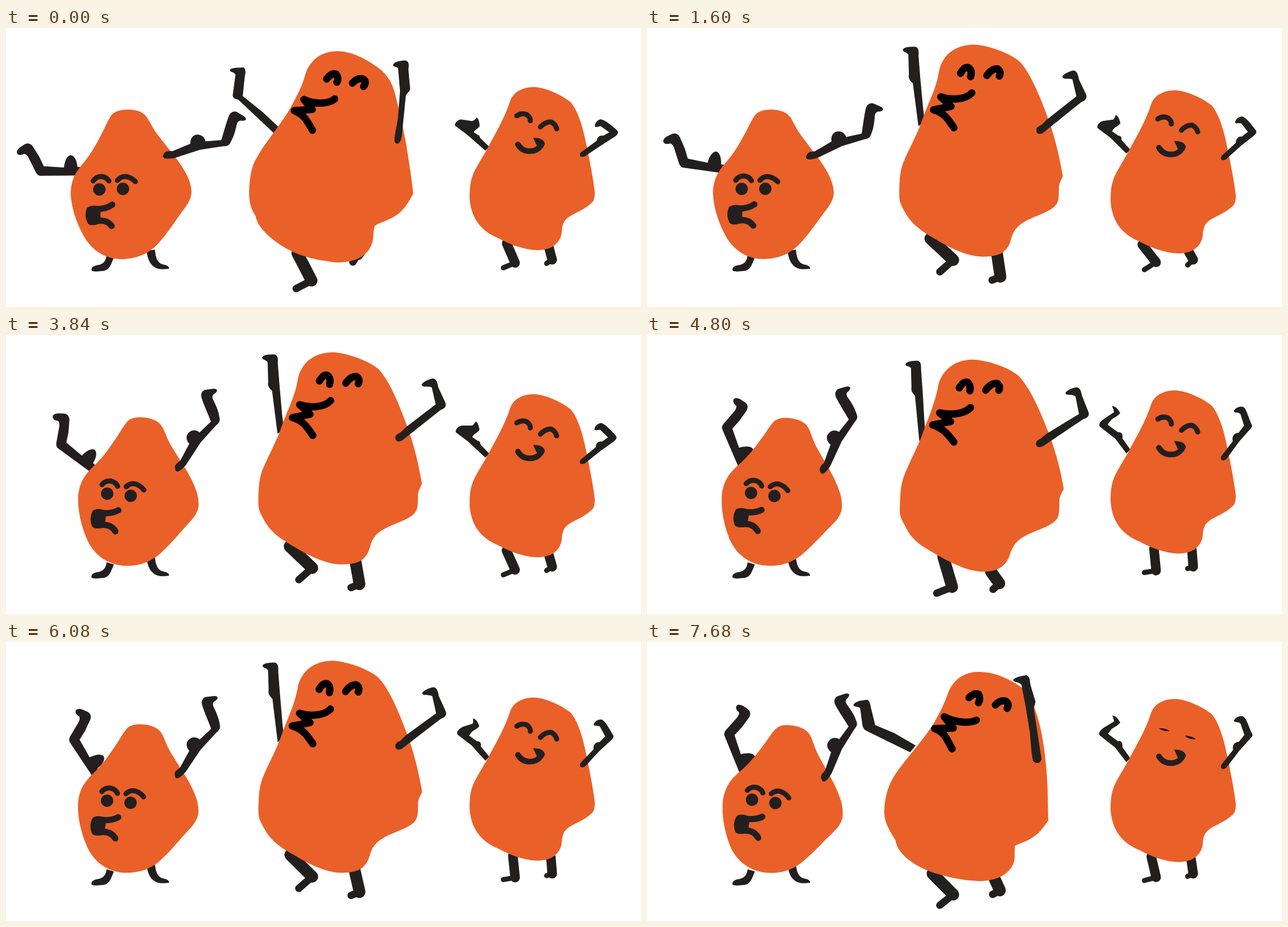
An HTML page that plays this animation: 1130 px wide and 496 px high, repeating every 8 s.

```html
<!DOCTYPE html>
<html lang="en">
<head>
<meta charset="utf-8">
<title>Three dancers</title>
<style>
html, body { margin: 0; height: 100%; overflow: hidden; background: #fff; }
svg { display: block; }
</style>
</head>
<body>
<svg id="stage" width="1130" height="496" viewBox="0 0 1130 496"></svg>
<script>
const ORANGE = '#ea6029', DARK = '#231f20', LIMB = '#22201f', STEP = 320, LOOP = 8000;
const stage = document.getElementById('stage');

const wave = turns => (1 - Math.cos(2 * Math.PI * turns)) / 2;
const smooth = u => u * u * (3 - 2 * u);
const frac = x => x - Math.floor(x);
const clamp = (x, lo, hi) => Math.min(hi, Math.max(lo, x));

// Blend two path strings that share the same commands.
function mix([a, b], u) {
  const ends = b.match(/-?[\d.]+/g);
  let n = 0;
  return a.replace(/-?[\d.]+/g, v => (+v + (ends[n++] - v) * u).toFixed(1));
}
const fill = (d, color) => `<path d="${d}" fill="${color}"/>`;
const line = (d, width, color) => `<path d="${d}" fill="none" stroke="${color}" stroke-width="${width}" stroke-linecap="round" stroke-linejoin="round"/>`;
const group = (transform, content) => `<g transform="${transform}">${content}</g>`;
function leg(joints, thigh, foot) {
  const [hx, hy, kx, ky, fx, fy] = joints.split(' ');
  return line(`M${hx} ${hy}L${kx} ${ky}`, thigh, LIMB) + line(`M${kx} ${ky}L${fx} ${fy}`, foot, LIMB);
}

const small = {
  body: 'M186 157C193 146 208 145 220 145C236 146 245 150 252 161C258 171 261 178 269 189L291 217C304 232 315 248 323 264C328 275 330 285 330 293C328 309 320 317 310 331C298 348 287 365 271 383C256 399 236 410 207 411C176 411 153 395 139 371C125 346 117 322 115 296C115 274 121 260 135 243C152 223 160 207 169 190C176 177 180 166 186 157Z',
  leftArm: 'M30 209C36 204 42 204 47 210L59 229L67 246L103 248C104 238 108 227 115 226C122 227 126 236 127 247L155 248V262L60 263C56 262 53 258 51 253L41 233C38 226 33 222 30 225C24 227 20 226 19 221C20 215 25 212 30 209Z',
  rightArm: 'M281 223C283 219 288 218 296 219L328 206C328 194 335 189 343 190C350 191 354 196 355 202L383 200C387 189 391 172 397 157C400 150 406 148 411 150L424 158C430 163 427 166 421 166C416 165 413 166 411 172C408 185 405 195 400 203C397 210 393 211 386 211L345 217L300 231C288 233 279 233 279 227Z',
  legs: 'M179 404C178 413 174 419 166 421C158 422 152 424 152 430C153 434 162 433 172 432C184 431 186 422 192 408ZM250 396C252 408 254 418 264 425C271 430 282 429 290 428C291 423 284 421 278 420C269 417 266 407 265 394Z',
  brows: 'M155 272Q160 264 170 264Q179 265 183 272M198 271Q204 264 212 264Q222 265 230 273',
  mouth: 'M160 322Q178 322 189 314M160 344Q178 339 188 352'
};

// Every pair holds the high and the low end of the bounce.
const swayRight = {
  body: ['M519 80C524 48 548 29 582 29C606 30 646 44 663 59C683 79 703 130 715 164C728 200 735 235 740 263C735 275 734 275 733 283C733 305 732 310 725 317C708 333 670 336 654 360C646 372 650 384 635 397C625 405 610 406 595 406C570 405 545 393 525 382C500 367 475 355 460 329C452 315 449 308 449 298C449 270 450 255 456 239C464 219 480 190 488 168C498 137 514 110 519 80Z',
    'M517 98C522 68 548 48 578 48C606 49 640 60 660 76C682 98 700 140 714 175C727 208 737 245 742 277C736 288 735 290 734 298C734 322 733 328 727 334C708 352 669 354 653 378C644 392 646 402 632 415C622 423 610 425 595 425C568 423 540 408 520 397C495 382 472 374 459 342C452 330 450 325 450 315C451 285 452 270 457 256C466 232 480 205 488 186C497 160 512 125 517 98Z'],
  leftArm: ['M455 38C458 33 468 33 477 33C483 34 484 41 483 48L486 86L491 140L494 166L483 174L473 98C466 92 465 88 466 82L465 47C460 41 456 43 455 38Z',
    'M461 56C464 50 474 50 483 49C489 51 489 58 489 65L492 107L494 150L496 180L485 193L478 111C472 104 471 100 472 96L471 62C466 58 462 60 461 56Z'],
  rightArm: ['M693 182C692 177 697 174 702 172L712 162L764 121L757 91C750 88 742 92 739 87C739 82 752 76 759 75C766 76 767 84 769 92L781 117C784 124 780 129 773 131L705 186C699 190 693 188 693 182Z',
    'M692 198C691 192 697 189 701 187L710 180L770 146L764 114C758 109 748 113 746 108C748 103 760 99 767 98C774 100 774 107 776 114L787 143C789 150 784 153 777 155L706 200C699 204 693 203 692 198Z'],
  face: ['M558 80Q565 68 572 70Q579 74 576 86M605 84Q613 72 623 72Q631 76 627 85M578 115C566 128 540 128 523 122L541 139L510 145C528 150 535 160 546 177',
    'M555 98Q562 86 570 88Q576 94 574 103M602 102Q612 89 623 90Q629 95 626 102M575 133C563 146 535 146 520 143L540 158L508 164C525 170 535 180 546 194']
};
const swayLeft = {
  body: ['M533 84C541 60 560 43 590 43C620 43 650 62 668 76C685 92 690 108 694 125C702 155 709 190 712 210C717 245 721 270 723 298C716 310 712 318 703 327C688 343 660 348 656 354C652 366 657 378 647 394C636 410 618 418 588 418C550 414 530 408 511 400C480 386 447 360 444 337C434 322 431 310 431 292C432 265 436 245 447 229C460 206 495 165 508 140C520 118 527 105 533 84Z',
    'M536 90C546 66 565 53 591 53C620 53 650 68 668 82C685 98 690 118 694 130C702 155 708 190 711 230C713 255 713 270 714 318C708 325 706 330 697 339C680 354 668 356 655 362C653 376 657 388 649 400C638 416 620 425 590 425C552 423 530 416 509 410C480 400 446 380 442 352C428 330 422 318 422 300C423 275 430 252 442 235C458 211 495 170 510 145C520 128 529 110 536 90Z'],
  leftArm: ['M394 80C398 75 410 76 418 75C423 78 422 85 421 92L419 125L455 152L485 178L475 188L410 132C400 130 400 126 401 120L404 88C400 82 394 85 394 80Z',
    'M367 112C372 104 384 104 392 103C397 106 397 113 399 120L406 148L440 162L478 184L468 196L392 159C385 156 384 152 383 147L379 118C374 114 368 117 367 112Z'],
  rightArm: ['M683 66C685 60 698 58 706 58C712 60 712 66 711 74L715 108C714 114 710 115 708 120L704 195C702 207 695 210 691 204C689 195 693 180 695 160L697 112L693 72C688 68 684 70 683 66Z',
    'M651 68C654 62 668 60 675 59C681 61 681 68 682 76L691 106C690 112 689 114 688 118L702 208C700 217 691 217 687 211C684 200 683 180 681 160L673 112L666 76C660 70 653 72 651 68Z'],
  face: ['M571 92Q580 80 588 84Q593 92 589 98M617 100Q626 90 636 93Q643 98 637 106M585 128C575 136 550 138 530 128L545 146L513 148C530 155 535 165 545 183',
    'M573 99Q582 90 590 93Q594 101 590 108M620 112Q628 103 638 105Q645 110 641 118M586 139C575 145 550 144 529 133L545 153L512 154C530 161 533 172 543 190'],
  legs: [['517 402 544 449 517 464', '508 412 545 449 521 468'], ['628 400 626 408 617 421', '618 420 628 442 615 449']]
};
const standing = [['538 380 543 448 514 452', '524 398 543 448 516 461'], ['612 405 627 436 615 446', '612 425 627 443 616 454']];
const stepping = [['504 374 545 412 521 433', '512 393 545 435 521 455'], ['623 400 629 442 614 448', '610 420 630 453 614 459']];

const slim = {
  body: 'M897 132C903 115 920 107 940 107C962 108 990 122 1005 134C1020 152 1028 185 1034 215C1040 245 1045 270 1048 295C1047 310 1045 311 1036 318C1020 331 998 334 992 349C987 362 992 368 983 381C975 392 962 397 945 397C920 396 895 386 877 376C850 365 828 345 825 305C825 285 826 275 832 260C840 243 852 226 860 210C875 182 888 160 897 132Z',
  leftArm: ['M827 125C833 124 838 130 842 137C838 143 830 145 826 149L819 158L838 172C844 170 848 176 846 183L860 203L853 210L834 184L806 162C803 157 808 152 815 147L831 136C831 131 828 128 827 125Z',
    'M841 160C844 164 844 170 843 177C841 180 840 181 838 182L836 184L840 186C841 187 842 188 843 190L860 204L853 211L815 181L797 168C797 163 801 158 808 158L829 165C834 165 838 163 841 160Z'],
  rightArm: ['M1044 133C1047 127 1056 124 1061 126C1067 130 1068 140 1075 157C1078 161 1075 164 1071 168L1054 188L1031 220C1025 225 1019 222 1022 215L1042 188C1040 180 1044 173 1052 173L1062 160L1056 139C1052 134 1045 138 1044 133Z',
    'M1049 178C1049 170 1052 166 1058 164C1066 165 1078 172 1091 180C1095 184 1093 187 1088 191L1060 206L1030 221C1022 224 1018 219 1023 214L1054 195C1056 187 1062 186 1066 188L1077 184L1059 176C1056 178 1051 180 1049 178Z'],
  eyes: 'M909 158Q918 152 927 156Q934 162 933 167M951 178Q960 168 970 169Q978 173 980 181',
  closed: 'M911 159Q922 159 930 164Q918 165 911 159ZM957 172Q968 173 977 178Q965 180 957 172Z',
  smile: 'M911 209Q918 221 932 221Q945 221 952 211',
  cheek: 'M938 197Q957 197 959 208Q957 216 946 214Z'
};

function drawSmall(i) {
  const turn = i / 4.4, lean = wave(turn - 0.025);
  const face = line(small.brows, 9, DARK) + line(small.mouth, 11, DARK) +
    `<circle cx="166" cy="287" r="11" fill="${DARK}"/><circle cx="208" cy="286" r="11" fill="${DARK}"/>` +
    `<path d="M148 323Q155 319 163 322V343Q155 347 150 345Q144 335 148 323Z" fill="${DARK}" stroke="${DARK}" stroke-width="10" stroke-linejoin="round"/>`;
  return fill(small.legs, DARK) +
    group(`translate(0 ${-2 * lean}) rotate(${10 * lean} 205 410)`,
      group(`rotate(${59 * smooth(wave(turn + 0.02))} 151 256)`, fill(small.leftArm, DARK)) +
      fill(small.body, ORANGE) + face +
      group(`rotate(${-60 * (1 - (1 - lean) ** 1.4)} 287 226)`, fill(small.rightArm, DARK)));
}

function drawBig(i) {
  const top = 29 + 24 * wave((i - 5.4) / 7.38) ** 1.15;
  const cycle = frac(0.137 * i - 0.01), right = cycle % 0.5 < 0.25;
  const pose = right ? swayRight : swayLeft;
  const legs = !right ? swayLeft.legs : cycle < 0.5 ? standing : stepping;
  const u = right ? (top - 29) / 19 : clamp((top - 43) / 10, -0.8, 1);
  return leg(mix(legs[0], u), 21, 13) + leg(mix(legs[1], u), 21, 13) +
    fill(mix(pose.leftArm, u), LIMB) + fill(mix(pose.body, u), ORANGE) +
    line(mix(pose.face, u), 13, '#000') + fill(mix(pose.rightArm, u), LIMB);
}

function drawSlim(i) {
  const drop = clamp(13.5 * (1 - wave(i * 6 / 11 - 0.77)) - 0.5, 0, 13);
  const fold = 1 - wave(i / 4.57 - 0.84);
  const arms = `translate(0 ${drop})`, body = `translate(0 ${drop - 9})`;
  const eyes = i === 24 ? fill(slim.closed, '#000') : line(slim.eyes, 9, DARK);
  return leg(`${903 - 1.7 * drop} ${380 + drop * 0.4} 906 ${419 - drop * 0.2} 885 ${422 + drop * 0.6}`, 17, 9) +
    leg(`${970 - drop * 0.6} ${382 + drop} 972 412 962 ${415 + drop * 0.5}`, 17, 9) +
    group(arms, fill(mix(slim.leftArm, fold), LIMB)) +
    group(body, fill(slim.body, ORANGE) + eyes + line(slim.smile, 10, DARK) + fill(slim.cheek, DARK)) +
    group(arms, fill(mix(slim.rightArm, fold), LIMB));
}

let shown = -1;
const start = performance.now();
function tick() {
  const i = Math.floor((performance.now() - start) % LOOP / STEP);
  if (i !== shown) {
    shown = i;
    stage.innerHTML = drawSmall(i) + drawBig(i) + drawSlim(i);
  }
  requestAnimationFrame(tick);
}
tick();
</script>
</body>
</html>
```
